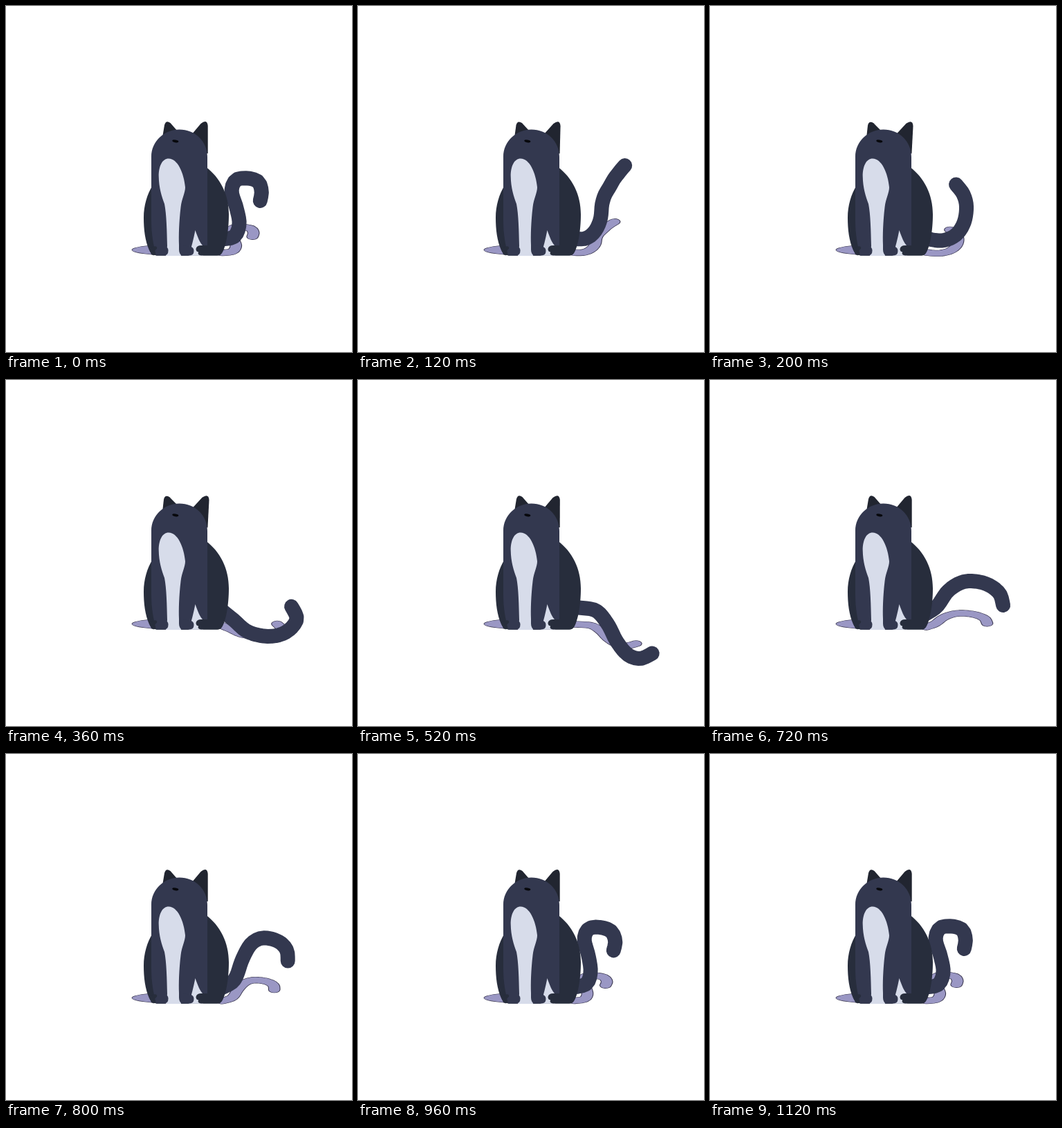
Recreate the animation shown at these times as an HTML page with a canvas. Size 500 px wide and 500 px high, loop 1320 ms.

```html
<!DOCTYPE html>
<html lang="en">
<head>
<meta charset="utf-8">
<title>Cat swinging its tail</title>
<style>
html, body { margin: 0; width: 100%; height: 100%; overflow: hidden; background: #fff; }
canvas { display: block; width: 100vw; height: 100vh; }
</style>
</head>
<body>
<canvas id="stage" width="500" height="500"></canvas>
<script>
const ctx = document.getElementById('stage').getContext('2d');
const LOOP = 1320, STEP = 40, LAST = 1120;
const SEGS = 28, TAIL_W = 21;
const COAT = '#33384f', HAUNCH = '#272d3c', EAR = '#212530';
const BIB = '#d7dcea', SHADE = '#9a97c4', EDGE = '#37344c';

// Centre line of the tail, root to tip, at key times
const rest = [312,337, 330,333, 337,315, 333,292, 326,268, 332,252, 348,249, 364,254, 369,268, 367,281.5];
const keys = [
  [0, rest],
  [200, [312,336, 335,339, 355,331, 367,313, 370.5,290, 366,272, 355.5,258]],
  [360, [308,330, 328,346, 350,364, 380,370.5, 405,364, 420,346, 412.5,327.5]],
  [520, [308,329, 325,329.5, 345,334, 361,353, 374,378, 390,397, 408,402.5, 425,395]],
  [560, [308,331, 326,328, 346,331, 364,349, 376,375, 387,397, 402,411, 419,414]],
  [640, [310,336, 330,324, 350,314, 372,317, 390,334, 402,356, 411,378]],
  [720, [312,338, 328,327, 343,306, 360,294, 377,290.5, 400,295, 418,308, 423.5,325.5]],
  [960, [312,337, 330,332, 336,315, 333,292, 327,268, 333,253, 348,250.5, 365,256, 371.5,270, 369,284]],
  [LAST, rest]
];
const times = keys.map(k => k[0]);
const poses = keys.map(k => toPose(k[1]));

function spline(a, b, c, d, u) {
  return b + u * ((c - a) + u * ((2 * a - 5 * b + 4 * c - d) + u * (3 * (b - c) + d - a))) / 2;
}

// Turns a point list into [root x, root y, length, angle, angle, ...]
function toPose(list) {
  const n = list.length / 2;
  const at = (i, axis) => list[Math.max(0, Math.min(n - 1, i)) * 2 + axis];
  const fine = [], dist = [0];
  for (let i = 0; i <= (n - 1) * 20; i++) {
    const k = Math.min(n - 2, Math.floor(i / 20)), u = i / 20 - k;
    const p = [0, 1].map(a => spline(at(k - 1, a), at(k, a), at(k + 1, a), at(k + 2, a), u));
    if (i) dist.push(dist[i - 1] + Math.hypot(p[0] - fine[i - 1][0], p[1] - fine[i - 1][1]));
    fine.push(p);
  }
  const total = dist[dist.length - 1];
  const pose = [list[0], list[1], total];
  let j = 0, prev = fine[0], last = 0;
  for (let s = 1; s <= SEGS; s++) {
    const goal = total * s / SEGS;
    while (j < dist.length - 2 && dist[j + 1] < goal) j++;
    const f = (goal - dist[j]) / (dist[j + 1] - dist[j]);
    const p = [0, 1].map(a => fine[j][a] + (fine[j + 1][a] - fine[j][a]) * f);
    let ang = Math.atan2(p[1] - prev[1], p[0] - prev[0]);
    ang += Math.round((last - ang) / (2 * Math.PI)) * 2 * Math.PI;
    pose.push(ang);
    last = ang;
    prev = p;
  }
  return pose;
}

// Slope at a key, kept flat at turning points so nothing overshoots
function slope(k, c) {
  if (k === 0 || k === poses.length - 1) return 0;
  const a = (poses[k][c] - poses[k - 1][c]) / (times[k] - times[k - 1]);
  const b = (poses[k + 1][c] - poses[k][c]) / (times[k + 1] - times[k]);
  return a * b > 0 ? 2 * a * b / (a + b) : 0;
}

function tailAt(t) {
  let k = 0;
  while (k < times.length - 2 && t >= times[k + 1]) k++;
  const h = times[k + 1] - times[k], u = (t - times[k]) / h, v = 1 - u;
  const pose = poses[k].map((a, c) =>
    a * (1 + 2 * u) * v * v + poses[k + 1][c] * u * u * (3 - 2 * u) +
    h * u * v * (slope(k, c) * v - slope(k + 1, c) * u));
  let [x, y, len] = pose;
  const path = new Path2D();
  path.moveTo(x, y);
  for (const a of pose.slice(3)) {
    x += Math.cos(a) * len / SEGS;
    y += Math.sin(a) * len / SEGS;
    path.lineTo(x, y);
  }
  return path;
}

function shape(color, d) {
  ctx.fillStyle = color;
  ctx.fill(new Path2D(d));
}

function oval(color, x, y, rx, ry, turn = 0) {
  ctx.fillStyle = color;
  ctx.beginPath();
  ctx.ellipse(x, y, rx, ry, turn, 0, 7);
  ctx.fill();
}

function strokeTail(path, color, width) {
  ctx.strokeStyle = color;
  ctx.lineWidth = width;
  ctx.lineCap = ctx.lineJoin = 'round';
  ctx.stroke(path);
}

function shadow(tail) {
  for (const [color, grow] of [[EDGE, 0.4], [SHADE, -0.4]]) {
    oval(color, 245, 352.5, 63 + grow, 7.8 + grow);
    ctx.save();
    ctx.transform(0.79, 0, 0, 0.42, 66, 215);
    strokeTail(tail, color, TAIL_W + grow * 3.4);
    ctx.restore();
  }
}

function ear(d, x, y, turn) {
  ctx.save();
  ctx.translate(x, y);
  ctx.rotate(turn);
  ctx.translate(-x, -y);
  shape(EAR, d);
  ctx.restore();
}

function cat(twitch) {
  ear('M226 190 L229 172 Q231 164.5 237.5 169 L248 181 L245 195Z', 240, 190, -0.07 * twitch);
  ear('M268 186 L281.5 170 Q290.5 163 291.7 173 L291.7 213 L280 213Z', 285, 208, 0.065 * twitch);

  // Haunches
  shape(HAUNCH, 'M288 232 C310 248 322 273 322 301 C322 325 318 348 312 357 Q310 360.5 305 360.5 ' +
    'L218 360.5 Q210 360.5 207 353 C201 339 199 323 199 306 C199 288 204 272 212 259Z');

  // Head, trunk and front legs
  shape(COAT, 'M210 218 C210 195 229 178.5 250.5 178.5 C273 178.5 291 195 291 218 L291 347 L271 350 ' +
    'Q273 360.5 265 360.5 L217 360.5 C213 345 210 330 210 310Z');

  // Bib and the gap between the legs
  shape(BIB, 'M235 220.5 C248 220.5 257 241 259 262 C259 270 254 278 252.5 291 C250 312 249.5 332 250 345 ' +
    'L253 361 L231 361 L233 347 C232.5 325 232 301 229 286 C225 275 221 263 220.7 246 C220.7 231 226 220.5 235 220.5Z');
  shape(BIB, 'M273.5 324 C277 334 280 342 285 347 L285 360.8 L264 360.8 C268 349 271 337 273.5 324Z');

  // Paws
  shape(COAT, 'M215 347 L229 347 Q234.5 348 234.5 353.5 Q234.5 360.5 228 360.5 L217 360.5Z');
  shape(COAT, 'M250 345 L265 347.5 Q271.5 348 271.5 354 Q271.5 360.5 265 360.5 L255 360.5 Q250 359 250 352Z');
  shape(HAUNCH, 'M207 351 Q212 346 217 347.5 Q220 350 215.5 353 Q212 356 214 360.5 L210 359Z');
  shape(HAUNCH, 'M282 346 L316 346 Q313 360.5 306 360.5 L282 360.5 Q276.5 360 278 355.5 Q274.5 355 274.5 351 Q275.5 346 282 346Z');

  oval('#07080c', 244.8, 195.3, 4.6, 1.9, 0.17);
}

function draw(now) {
  const t = Math.min(LAST, Math.floor((now % LOOP) / STEP) * STEP);
  const twitch = t < 560 ? Math.sin(Math.PI * t / 560) ** 2 : 0;
  const tail = tailAt(t);
  ctx.fillStyle = '#fff';
  ctx.fillRect(0, 0, 500, 500);
  shadow(tail);
  strokeTail(tail, COAT, TAIL_W);
  cat(twitch);
}

let start;
function tick(now) {
  if (start === undefined) start = now;
  draw(now - start);
  requestAnimationFrame(tick);
}
draw(0);
requestAnimationFrame(tick);
</script>
</body>
</html>
```
